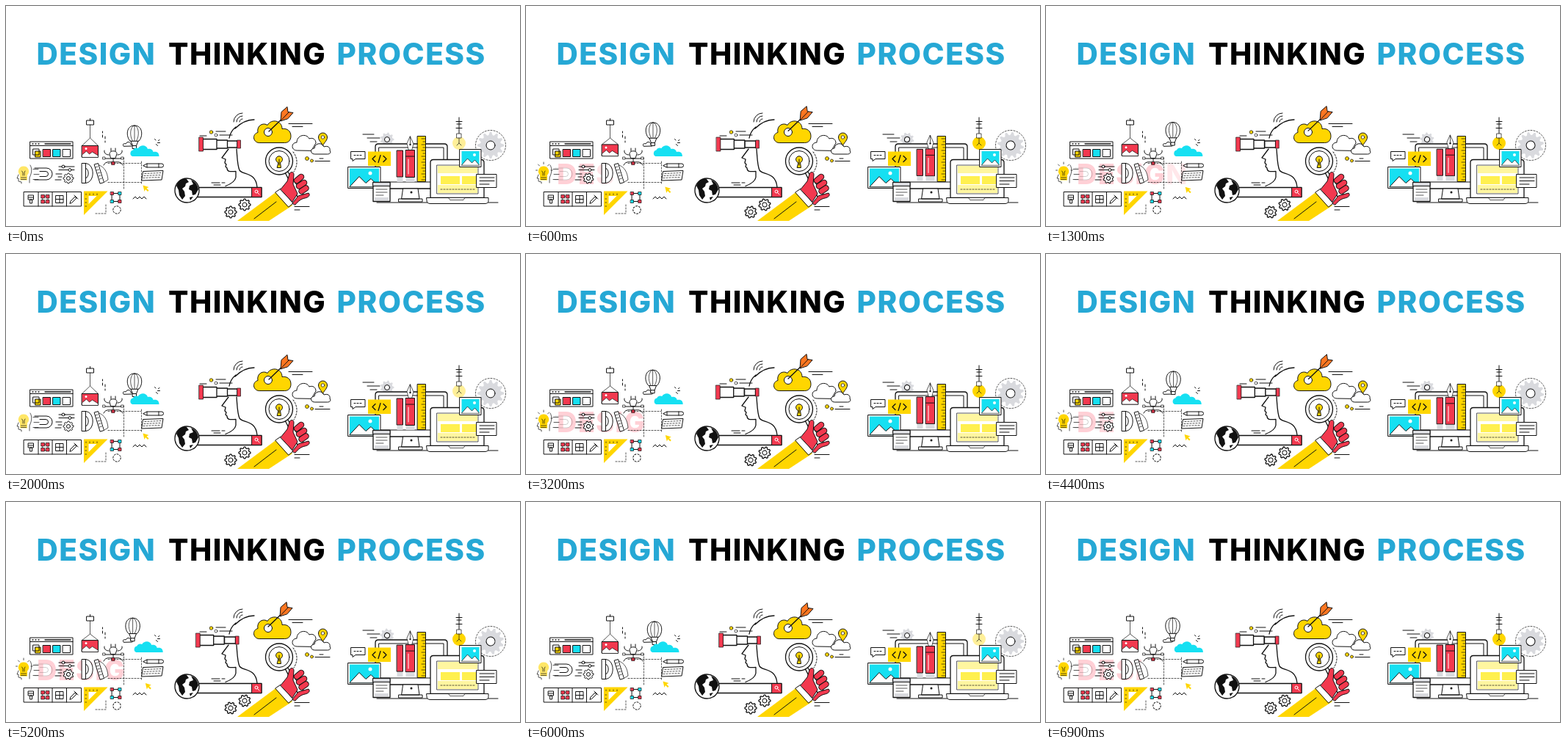
Animation, 700 px wide and 300 px high, one loop 7 s. Source, as an HTML page:

```html
<!DOCTYPE html>
<html lang="en">
<head>
<meta charset="utf-8">
<title>Design thinking process</title>
<style>
html, body { margin: 0; width: 100%; height: 100%; overflow: hidden; background: #fff; }
svg { display: block; width: 700px; height: 300px; fill: none; stroke: #111; stroke-linecap: round; stroke-linejoin: round; }
text { font-family: Inter, sans-serif; font-weight: 800; stroke: none; }
.title { font-size: 40.5px; letter-spacing: 1.5px; }
.y { fill: #ffd600; } .r { fill: #f2394f; } .c { fill: #16e0f2; } .w { fill: #fff; } .g { fill: #d9dade; } .k { fill: #111; }
.p { fill: #fff6a0; } .n { stroke: none; } .d { stroke-dasharray: 2 2; } .t { stroke-width: .7; }
.b { stroke-width: 1.3; } .wl { stroke: #fff; }
</style>
</head>
<body>
<svg viewBox="0 0 700 300">
  <g class="title">
    <text x="41.5" y="79.500" fill="#26a8d5">DESIGN</text>
    <text x="221" y="79.500" fill="#000">THINKING</text>
    <text x="450.5" y="79.500" fill="#26a8d5">PROCESS</text>
  </g>
  <text id="word" x="42" y="243" font-size="38" letter-spacing="1.2" fill="#ffd0d6"></text>

  <!-- design tools -->
  <g>
    <path class="w" d="M33 185h58v23H33zM33 190.500h58"/>
    <path class="b" d="M36 188h1m3 0h1m3 0h1m8 0h35"/>
    <path class="y" d="M40 198h7v8h-7z"/><path d="M37 195h8v8h-8z"/>
    <path class="r" d="M50.500 195.500h10v10h-10z"/><path class="c" d="M64 195.500h10v10H64z"/><path class="w" d="M77.500 195.500h10v10h-10z"/>

    <path class="w" d="M110 156h9.500v6H110zM114.500 153.500v2.500"/>
    <path class="t" id="rope"/>
    <g id="crate">
      <path class="r" d="M103.500 190.500h22v15.500h-22z"/>
      <path class="w t" d="M103.500 206v-3l6-5 4 4 4-3 8 5v2z"/><circle class="w n" cx="109" cy="194.500" r="1.500"/>
    </g>
    <path d="M131.500 171v2m0 3v3M135 178v3m0 3v2"/>

    <path class="w" d="M160 191c-2-3 1-4 3-3 2-4 7-3 7 1 3 0 3 2 2 2z"/>
    <g id="balloon">
      <path class="w" d="M169 184c-6-6-5.500-21 6-21s12 15 6 21z"/>
      <path class="t" d="M172.500 184c-5-8-3-20 2.500-21 5.500 1 7.500 13 2.500 21M175 163v21"/>
      <path class="w" d="M172.500 190.500h5v4h-5zM170 184l2.500 6.500M180 184l-2.500 6.500"/>
    </g>
    <path id="cyanCloud" class="c n" d="M172 205a4.500 4.500 0 0 1 1-8.500 5 5 0 0 1 7-2.500c3-5 11-5 13 1 4-1 7 1 7.500 4 6-1 8 2 8 6z"/>
    <path d="M204 183l-1.500-1.500M206.500 186.500h3M204.500 188.500l2 2M207.500 183.500l1.500-1"/>

    <path class="w" d="M141 201.500c0-5 10-5 10 0l-2 6h-6zM143 198v-4m6 4v-4M146 207.500v5M134 197c-1 3 2 6 6 6M158 197c1 3-2 6-6 6"/>
    <path d="M133 217c3-6 8-4 13-4s10-2 13 4M134 208h24"/>
    <path class="r t" d="M144 212.500h4v4h-4z"/><path class="w t" d="M132 206h3v3h-3zM157 206h3v3h-3z"/>

    <path id="rays" class="t" d="M24 213v2.500M16.500 216l2 2M31.500 216l-2 2M13.500 224h2M34 224h2"/>
    <path class="t" d="M17 230l-2 5h2v4l4 1v2M33 217c3 5 2 11-1 17v7M37 222.500h7M38 229.500h7M37 236.500h7"/>
    <path id="idea" class="y n" d="M24 218.500a7 7 0 0 1 5 12v7h-10v-7a7 7 0 0 1 5-12z"/>
    <path class="t" d="M20.500 234h7M20.500 236.500h7M23 231v-4l-1.500-2m4.500 0L25 227v4"/>
    <path id="arcs" d="M39 221h16a8 8 0 0 1 0 16H39M46 225.500h8a3.500 3.500 0 0 1 0 7h-8"/>

    <path d="M72 219h21M72 223.500h21"/><circle class="w" cx="78" cy="219" r="2"/><circle class="w" cx="87" cy="223.500" r="2"/>
    <path d="M68 229h8m-5 4h5m-9 4h8"/>
    <g id="gearSmall"></g>
    <path class="w" d="M103.500 214.500h5v27h-5zM108.500 214.500c13 1 13 26 0 27M108.500 221c5 2 5 12 0 14"/>
    <path class="w" d="M120.500 216l5-1.500 8 26-5 1.500z"/><path class="t" d="M122 220l3-1M123.500 224l3-1m-1.500 5l3-1m-2 5l3-1m-1.500 5l3-1"/>
    <path class="w t" d="M127 217c7 3 11 9 12 20l-5 3"/>
    <path class="d t" d="M139 214.500h45M139 240.500h45M160.500 207v42M184.500 212v30"/>
    <path class="w" d="M187 217.500l5-2.500h20a2.500 2.500 0 0 1 0 5h-20zM192 215v5M208 215v5"/>
    <path class="w" d="M187 225.500l27-1-2 12.500-27 1z"/><path class="d t" d="M189 228.500l22-1m-23 4l22-1m-23 4l22-1"/>

    <path class="w" d="M24.500 253.500h78v19.500h-78zM44 253.500v19.500M63 253.500v19.500M82.500 253.500v19.500"/>
    <path d="M30.500 258h7v6h-7zM33 264h2.500v5H33zM30.500 261h7M68 258.500h10v10H68zM73 258.500v10M68 263.500h10M87 269l1-3 6-6 2 2-6 6zM93 258l5 5"/>
    <path class="t" d="M50 259.500h7v8h-7z"/><path class="r t" d="M48 257.500h4.500v4.500H48zM54.500 257.500h4.500v4.500h-4.500zM48 264.500h4.500v4.500H48zM54.500 264.500h4.500v4.500h-4.500z"/>
    <path class="y n" fill-rule="evenodd" d="M106 252.500h32.500L106 285zM112.500 259v11l11-11z"/><path class="t" d="M109 256v1.500m5-1.500v1.500m5-1.500v1.500m5-1.500v1.500M108 263h1.500m-1.500 5h1.500m-1.500 5h1.500"/>
    <path class="d t" d="M122 283h14v-14"/>
    <path d="M144.500 255.500h10.500v11h-10.500z"/><path class="r t" d="M142.500 253.500h4v4h-4zM153 264.500h4v4h-4z"/><path class="c t" d="M153 253.500h4v4h-4zM142.500 264.500h4v4h-4z"/>
    <circle id="ring" class="d" cx="151" cy="278" r="5.200"/>
    <path d="M173 263l3-3 3 3 3-3 3 3 3-3 3 3"/>
    <path id="cursor" class="y n" d="M186.500 244.500l8 2.500-3 1.500 3 3-1.500 1.500-3-3-1.500 3z"/>
  </g>

  <!-- research -->
  <g>
    <path d="M318 158a4 4 0 0 1 4-4M314 158a8 8 0 0 1 8-8M310 158a12 12 0 0 1 12-12"/>
    <path class="b" d="M304 180c1-6 4-11 9-15M312 167c8-8 17-12 26-12"/><path class="d" d="M391 199c6 8 7 17 1 27"/>
    <circle class="y t" cx="279.500" cy="172" r="2.300"/><circle class="w t" cx="286" cy="176" r="2"/><path d="M291 176h17M286 171h13M264 177h9"/>
    <path class="b" d="M303 195l-9 12 5 2-1 5 2 2-1 3 2 2c0 5 3 5 12 4.500v8c-1 6-6 9-14 12M314 195c1 12 1 22 4 29 5 7 22 2 24 23"/>
    <g id="scopeEnd"><path class="w b" d="M300 184h15v9h-15z"/><path class="r t" d="M315 183h4.500v11H315z"/></g>
    <g id="scope"><path class="w b" d="M268 181.500h19v14h-19zM287 183h14.500v11H287z"/><path class="r t" d="M263 179h5.500v19H263z"/></g>
    <path class="w b" d="M238 247.500h110v13H238z"/><path class="r" d="M335 247.500h13v13h-13z"/><circle class="wl" cx="341" cy="253" r="2"/><path class="wl" d="M342.500 254.500l2.500 2.500"/>
    <path d="M280 241h11m3 0h4M283 244h9"/>
    <circle class="w b" cx="246.500" cy="251.500" r="16.500"/>
    <path class="k n" d="M232 245c3-7 8-10 14-9l3 4-4 2-1 4-4 3 3 4 1 6-4 5-4-6-1-7zM252 237c6 2 9 7 10 13l-4 7-4 1-1-6-4-2 1-5 5-2zM250 261l5-1-4 5z"/>
    <path class="y" d="M344 186.500c-8-1-9-12-1-14-2-10 8-14 13-10 5-9 20-7 20 5 7-1 12 3 12 10 0 5-3 9-8 9z"/>
    <circle class="w" cx="357" cy="172" r="5.500"/>
    <g id="dart"><path class="b" d="M358 171l25-24"/><path fill="#ff7621" d="M374 156.500l1-12 8-7 1 7 7 1-7 8z"/><path d="M374 156.500l11-11.500"/></g>
    <path d="M385 160.500h32M390 164.500h14"/>
    <path class="w" d="M396 197c-8 0-8-11 0-11 0-10 13-13 17-5 5-2 9 1 9 6l-6 10z"/>
    <path class="w" d="M420 202c-6 0-6-8 0-8 1-8 11-8 13-2 5-2 9 1 8 5 2 3 0 5-3 5z"/>
    <path class="y" d="M431.500 190c-3-5-6-7-6-11a6 6 0 0 1 12 0c0 4-3 6-6 11z"/><circle class="w t" cx="431.500" cy="179" r="2.200"/>
    <circle class="y t" cx="410" cy="208" r="2.500"/><circle class="y t" cx="416.500" cy="211" r="2"/><path d="M421 211.500h20M427 208h5"/>
    <path class="w b" d="M380 227l3-2 22 32-7 5z"/>
    <circle cx="372" cy="211.500" r="18.500" class="w b"/><circle class="w" cx="372" cy="211.500" r="14"/>
    <path class="y" d="M370.500 213.500a4.500 4.500 0 1 1 3 0l1 7h-5z"/><path d="M372 209v8"/>
    <path class="y n" d="M315 293l55-41 20 20-32 21z"/><path d="M338 290l30-23"/>
    <path class="w" d="M367 254l7-5 17 20-6 5z"/>
    <path class="r" d="M374 250l9-11 3-10c2-4 6-3 6 1l-1 13 6 13-7 11z"/>
    <path class="r" d="M390 269l8-10 14-4c3 3 0 6-5 7-5 1-9 4-13 9z"/>
    <path stroke-width="8.500" d="M396 238l6-5M399 245.500l7-4.500M402.500 252.500l6-4"/>
    <path stroke="#f2394f" stroke-width="6.500" d="M396 238l6-5M399 245.500l7-4.500M402.500 252.500l6-4"/>
    <path d="M393 273.500h20M393 278h7"/>
    <g id="gearA"></g><g id="gearB"></g>
  </g>

  <!-- production -->
  <g>
    <path d="M486 175h15M492 180h17M496 185h9"/>
    <g id="gearC"></g><g id="gearD"></g><circle class="d t" cx="660" cy="190" r="20.500"/>
    <path class="w b" d="M507 188h90q4 0 4 4v53q0 4-4 4h-90q-4 0-4-4v-53q0-4 4-4z"/><path d="M508 193h88v47h-88z"/>
    <path class="w" d="M541 249h20l2 14h-24zM535 263h32v4h-32z"/><circle class="k n" cx="552" cy="254" r="1.500"/>
    <path class="w" d="M470 198.500h19v10h-13l-4 3v-3h-2z"/><path class="d" d="M474 203.500h11"/>
    <path class="y n" d="M493 198.500h31v19.500h-15l-5 5v-5h-11z"/><path class="b" d="M503 204.500l-4 4 4 4M514 204.500l4 4-4 4M510 203.500l-3 10"/>
    <path class="w" d="M466 219.500h44v29h-44z"/><path class="c n" d="M468 221.500h40v25h-40z"/><path class="w" d="M468 246.500l13-14 9 9 7-6 11 11z"/><circle class="w n" cx="496" cy="228" r="2.500"/>
    <path class="w b" d="M500 240.500h23v26h-23z"/><path class="g" d="M500 240.500h23v5h-23z"/><path class="t" d="M504 250h15M504 254h15M504 258h10"/><path class="g n" d="M502 261h19v4h-19z"/>
    <g id="pens">
      <path class="r" d="M532.500 197h8v36h-8z"/><path class="g n" d="M532.500 234h8v6h-8z"/>
      <path class="w t" d="M550.500 178l4.500 10-2.500 9h-4l-2.500-9z"/><path class="t" d="M550.500 178v10"/><circle class="k n" cx="550.500" cy="189" r="1.200"/>
      <path class="r" d="M544.500 196.500h12v37h-12zM544.500 205h12"/><path class="g n" d="M544.500 234h12v6h-12z"/><path class="wl" d="M548 209v20"/>
    </g>
    <path class="y" d="M560.500 177.500h11v62h-11z"/><path id="ticks" class="t"/>
    <path d="M505 268h165"/>
    <path class="w b" d="M582 209.500h65q4 0 4 4v48h-73v-48q0-4 4-4z"/><path class="w t" d="M587 217h56v39h-56z"/>
    <path class="p n" d="M588 218h54v10h-54zM588 244h54v11h-54z"/><path class="n" fill="#fff04f" d="M592 232h26v11h-26zM621 232h19v11h-19z"/><path class="d t" d="M592 250h46"/>
    <path class="w" d="M573 261.500h84v4q0 4-5 4h-74q-5 0-5-4z"/><path class="w t" d="M603 261.500h22l-2 3h-18z"/>
    <path d="M613 157.500h8M614 161h6M613 166.500h8M617 152v24"/>
    <circle id="lamp" class="y n" cx="617" cy="187" r="9"/>
    <path class="w t" d="M614 174h6v6h-6z"/><path class="t" d="M617 180v7l-3 3m3-3l3 3"/>
    <path class="w" d="M618 195.500h29v24h-29z"/><path class="c n" d="M620.500 198h24v19h-24z"/><path class="w t" d="M620.500 217l8-9 6 6 4-4 6 7z"/><circle class="w n" cx="638" cy="203" r="2"/>
    <path class="w" d="M641 229.500h27v18h-27z"/><path d="M645 234h20M645 238.500h20M645 243h13"/>
  </g>
</svg>
<script>
const $ = id => document.getElementById(id);
const LOOP = 7000, CYCLE = 2000, STEP = 100;
const clamp = v => Math.max(0, Math.min(1, v));

function gear(id, x, y, radius, hole, teeth, attrs, speed) {
  const points = [];
  for (let i = 0; i < teeth * 4; i++) {
    const a = (i - .5) * Math.PI / teeth / 2, r = i % 4 < 2 ? radius : radius * .78;
    points.push((r * Math.cos(a)).toFixed(2) + ',' + (r * Math.sin(a)).toFixed(2));
  }
  $(id).innerHTML = `<polygon points="${points.join(' ')}" ${attrs}/><circle r="${hole}" class="w"/>`;
  return p => $(id).setAttribute('transform', `translate(${x} ${y}) rotate(${p * speed})`);
}
const gears = [
  gear('gearSmall', 85, 235, 7, 2.5, 8, 'class="w"', 45),
  gear('gearA', 306, 281, 8, 3, 8, 'class="w b"', 45),
  gear('gearB', 325, 271, 8, 3, 8, 'class="w b"', -45),
  gear('gearC', 519, 182, 9.5, 3.5, 9, 'class="g n"', 40),
  gear('gearD', 660, 190, 18, 6, 12, 'class="g n"', 30)
];

$('word').innerHTML = [...'DESIGN'].map(c => `<tspan>${c}</tspan>`).join('');
const letters = [...$('word').children];
$('ticks').setAttribute('d', Array.from({length: 15}, (_, i) => `M571 ${181 + i * 4}h-${i % 2 ? 3 : 5}`).join(''));

const move = (id, x, y) => $(id).setAttribute('transform', `translate(${x} ${y})`);

function draw(now) {
  const ms = Math.floor(now % LOOP / STEP) * STEP % CYCLE;
  const p = ms / CYCLE, sway = Math.sin(Math.PI * p);
  const lit = Math.min(1, sway * 1.8), fade = 1 - clamp((ms - 1600) / 300);

  letters.forEach((el, i) => el.setAttribute('fill-opacity', clamp((ms - i * 240) / 200) * fade));
  $('arcs').setAttribute('opacity', 1 - .8 * clamp(ms / 400) * fade);
  $('rays').setAttribute('opacity', lit);
  $('idea').setAttribute('opacity', .6 + .4 * lit);
  $('lamp').setAttribute('opacity', .4 + .6 * lit);

  move('balloon', -2.5 * sway, -5 * sway);
  move('cyanCloud', 5.5 * sway, 0);
  move('crate', 0, -2 * sway);
  $('rope').setAttribute('d', `M114.500 162v18L104 ${190 - 2 * sway}M114.500 180L125 ${190 - 2 * sway}`);
  move('cursor', 3.5 * sway, 2.5 * sway);
  move('scope', -4.5 * sway, 0);
  move('scopeEnd', -2.5 * sway, 0);
  move('dart', -sway, -sway);
  move('pens', 0, -2 * sway);
  $('ring').setAttribute('transform', `rotate(${p * 90} 151 278)`);
  gears.forEach(turn => turn(p));
}

const start = performance.now();
function tick() {
  draw(performance.now() - start);
  requestAnimationFrame(tick);
}
tick();
</script>
</body>
</html>
```
